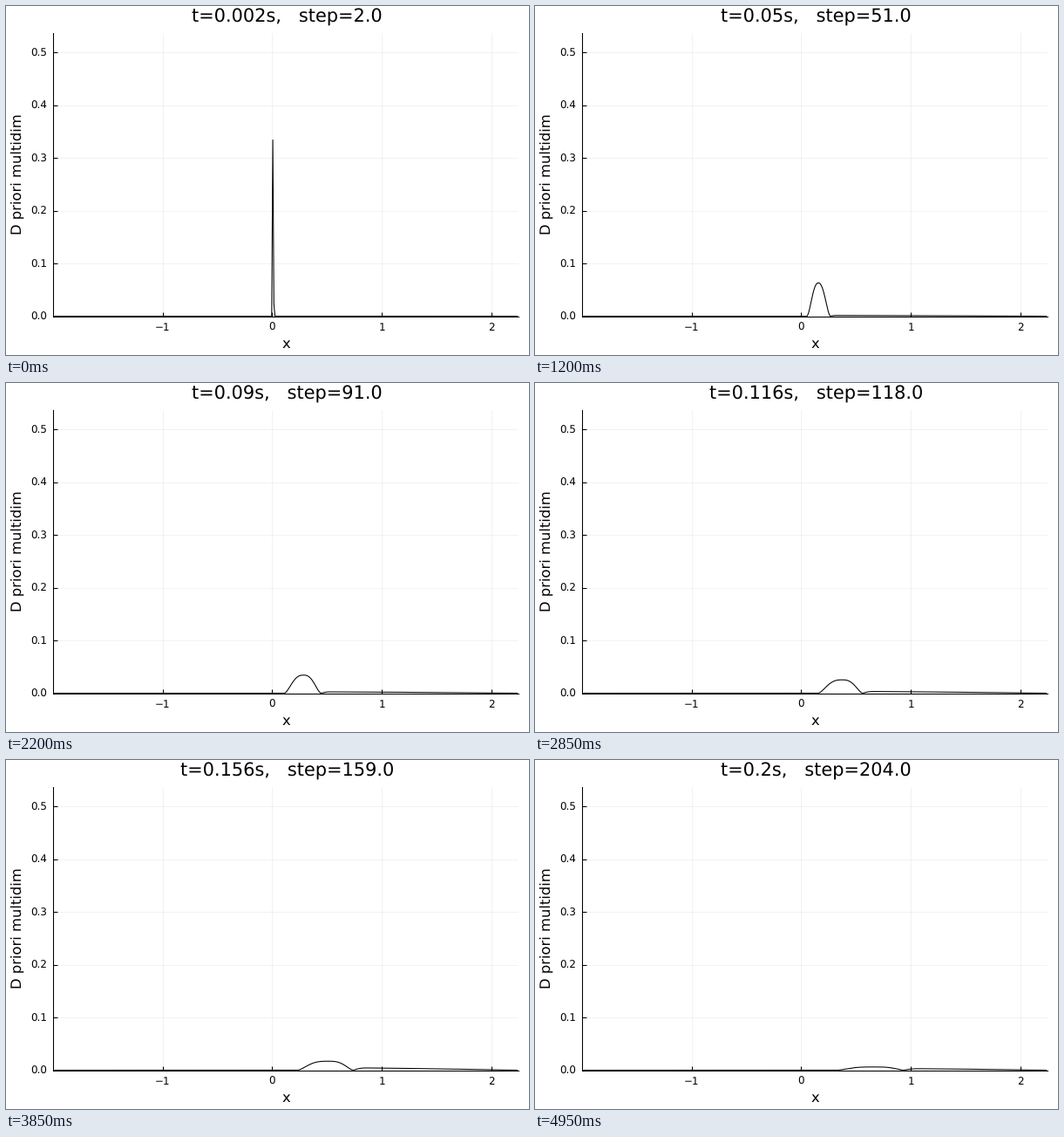
Recreate the animation shown at these times as a matplotlib script. Size 600 px wide and 400 px high, loop 5 s.

```python
import numpy as np
import matplotlib.pyplot as plt
from matplotlib.animation import FuncAnimation

W, H, DPI = 600, 400, 100
FRAMES, INTERVAL = 100, 50
LEFT, RIGHT, TOP, BOTTOM = 54.4, 588, 31, 355.52   # plot box in pixels
X_ZERO, X_UNIT, Y_UNIT = 305.45, 125.73, 605       # data scale in pixels
LINE = 0.77
TITLE, GUIDE, TICK = 15, 11.79, 8.57               # font sizes

plt.rcParams["font.family"] = "DejaVu Sans"
plt.rcParams["text.hinting"] = "none"
fig = plt.figure(figsize=(W / DPI, H / DPI), dpi=DPI, facecolor="white")
ax = fig.add_axes([LEFT / W, 1 - BOTTOM / H, (RIGHT - LEFT) / W, (BOTTOM - TOP) / H])


def put(x, y, text, size, ha="center", **kw):
    """Place text with its baseline at a pixel position."""
    return fig.text(x / W, 1 - y / H, text, fontsize=size, ha=ha, va="baseline", **kw)


def style_axes():
    ax.set_xlim((LEFT - X_ZERO) / X_UNIT, (RIGHT - X_ZERO) / X_UNIT)
    ax.set_ylim(0, (BOTTOM - TOP) / Y_UNIT)
    ax.set_axisbelow(True)
    ax.grid(color="black", alpha=0.1, linewidth=0.36)
    ax.spines[["top", "right"]].set_visible(False)
    ax.spines[["left", "bottom"]].set_linewidth(LINE)
    ax.tick_params(direction="in", length=3.8, width=LINE,
                   labelleft=False, labelbottom=False)
    xticks = np.arange(-1, 3)
    yticks = np.arange(6) / 10
    ax.set_xticks(xticks)
    ax.set_yticks(yticks)
    for v in xticks:
        put(X_ZERO + v * X_UNIT, 372, str(v).replace("-", "\u2212"), TICK)
    for v in yticks:
        put(46.8, BOTTOM - v * Y_UNIT + 4.5, f"{v:.1f}", TICK, ha="right")
    put(321.5, 392, "x", GUIDE)
    put(17.5, 193, "D priori multidim", GUIDE, rotation=90, rotation_mode="anchor")


x = np.arange(-1.985, 2.24, 0.01)
px = x * X_UNIT
SPIKE_CELL = np.argmin(abs(x - 0.005))
TAIL_END = 2.2 * X_UNIT


def profile(t):
    # the hump drifts right and widens; edges in pixels from x = 0
    start = 120 * t + 430 * t**2 - 0.6
    peak = 380 * t + 200 * t**2 + 0.1
    end = 560 * t + 5.5 * (1 - np.exp(-t / 0.02)) + 0.4
    height = 0.00425 * (1 - 2.15 * t) / (t + 0.01)
    side = np.where(px < peak, peak - start, end - peak)
    u = np.clip(abs(px - peak) / side, 0, 1)
    hump = height * (1 - u ** (1.9 + 7 * t)) ** 1.9

    # long, slowly falling tail ahead of the hump
    rise = np.clip((px - end) / (3 + 70 * t), 0, 1)
    fall = np.clip((px - end) / (TAIL_END - end), 0, 1)
    tail = 0.028 * t * rise * (2 - rise) * (1 - fall**1.4)

    # everything weakens near the end
    y = (hump + tail) * np.interp(t, [0.16, 0.2], [1, 0.53])

    # remnant of the initial spike
    spike = 0.334 * np.exp(-(t - 0.002) / 0.01) * np.clip((0.05 - t) / 0.02, 0, 1)
    y[SPIKE_CELL] = max(y[SPIKE_CELL], spike)
    return y


style_axes()
title = put(322.3, 18, "", TITLE)
curve, = ax.plot([], [], color="black", linewidth=LINE, clip_on=False,
                 solid_joinstyle="round")


def update(i):
    n = i + 1
    t = round(0.002 * n, 3)
    title.set_text(f"t={t}s,   step={float(51 * n // 25)}")
    curve.set_data(x, profile(t))
    return title, curve


anim = FuncAnimation(fig, update, frames=FRAMES, interval=INTERVAL,
                     repeat=True, repeat_delay=0)
plt.show()
```
